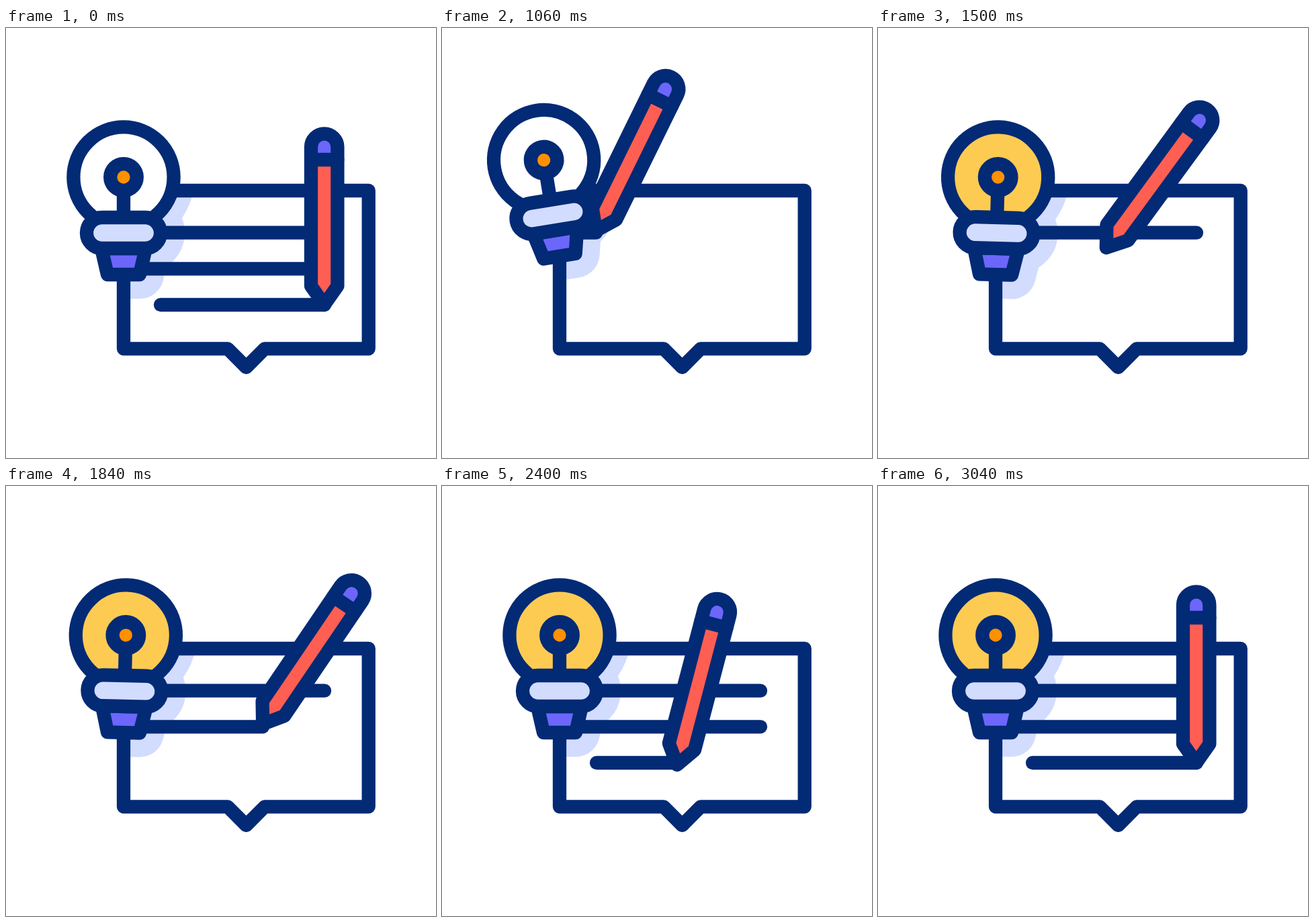
Recreate the animation shown at these times as an HTML page with a canvas. Size 640 px wide and 640 px high, loop 3.6 s.

```html
<!DOCTYPE html>
<html lang="en">
<head>
<meta charset="utf-8">
<title>Idea note</title>
<style>
html, body { margin: 0; width: 100%; height: 100%; overflow: hidden; background: #fff; }
canvas { display: block; width: 640px; height: 640px; }
</style>
</head>
<body>
<canvas id="stage" width="640" height="640"></canvas>
<script>
const ctx = document.getElementById('stage').getContext('2d');
const LOOP = 3600;
const W = 20.3;
const NAVY = '#032a75', PALE = '#d2dcff', VIOLET = '#6c66fa';
const RED = '#ff5f52', ORANGE = '#ff9000', YELLOW = '#fecb52';

const clamp = v => Math.max(0, Math.min(1, v));
const ease = u => u * u * (3 - 2 * u);
const span = (t, a, b) => ease(clamp((t - a) / (b - a)));
const mix = (a, b, s) => a + (b - a) * s;
const rad = deg => deg * Math.PI / 180;

// Each line is written from x to END while the pencil leans from tilt[0] to tilt[1].
const END = 474;
const LINES = [
  { x: 195, y: 304.7, dip: -3, write: [965, 1405], tilt: [25, 34.5] },
  { x: 195, y: 358.3, dip: -4, write: [1602, 1990], tilt: [38, 32.3] },
  { x: 230, y: 412, dip: 3, write: [2195, 2612], tilt: [21.3, 7.8] }
];
const WIPE = 512, WIPE_GAP = 150;

const rest = time => ({ time, x: 473.7, y: 412, tilt: 0 });
const stops = [rest(620)];
for (const { x, y, dip, write, tilt } of LINES) {
  [x, END].forEach((px, i) =>
    stops.push({ time: write[i], x: px, y: y + dip, tilt: tilt[i] }));
}
stops.push(rest(3040));

function pencilAt(t) {
  const i = Math.max(1, stops.findIndex(p => t < p.time));
  if (t >= stops.at(-1).time) return stops.at(-1);
  const a = stops[i - 1], b = stops[i], s = span(t, a.time, b.time);
  return { x: mix(a.x, b.x, s), y: mix(a.y, b.y, s), tilt: mix(a.tilt, b.tilt, s) };
}

// The bulb is knocked aside, then swings back with shrinking peaks.
const HIT = 905, PEAK = 1155, SWING = 228;
function swingAt(t) {
  const peak = n => n < 4 ? -13.6 * (-0.46) ** n : 0;
  if (t < PEAK) return peak(0) * span(t, HIT, PEAK);
  const n = (t - PEAK) / SWING, k = Math.floor(n);
  return mix(peak(k), peak(k + 1), ease(n - k));
}
const hopAt = t => -40 * (span(t, HIT, PEAK) - span(t, PEAK, PEAK + SWING));

function poly(points) {
  const p = new Path2D();
  points.forEach(([x, y]) => p.lineTo(x, y));
  p.closePath();
  return p;
}
function circle(x, y, r) {
  const p = new Path2D();
  p.arc(x, y, r, 0, Math.PI * 2);
  return p;
}
function pill(x, y, w, h) {
  const p = new Path2D();
  p.roundRect(x, y, w, h, h / 2);
  return p;
}

const bubble = poly([[175, 242], [539.7, 242], [539.7, 477.3], [385, 477.3],
  [357.5, 505], [330, 477.3], [175, 477.3]]);
const glass = circle(175, 222, 74.6);
const collar = pill(120, 282, 110, 46);
const socket = poly([[142, 328], [208, 328], [199, 367], [151, 367]]);

// pencil with its tip at the origin
const body = new Path2D();
body.arc(0, -235, 19.7, Math.PI, 0);
body.lineTo(19.7, -28);
body.lineTo(0, 0);
body.lineTo(-19.7, -28);
body.closePath();

function stroke(path, color = NAVY, width = W) {
  ctx.strokeStyle = color;
  ctx.lineWidth = width;
  ctx.stroke(path);
}
function fill(path, color) {
  ctx.fillStyle = color;
  ctx.fill(path);
}
function shape(path, color) {
  fill(path, color);
  stroke(path);
}
function segment(x1, y1, x2, y2) {
  const p = new Path2D();
  p.moveTo(x1, y1);
  p.lineTo(x2, y2);
  stroke(p);
}

function placeBulb(t) {
  ctx.translate(175, 367 + hopAt(t));
  ctx.rotate(rad(swingAt(t)));
  ctx.translate(-175, -367);
}

function drawShadow(t) {
  ctx.save();
  ctx.clip(bubble);
  placeBulb(t);
  fill(circle(175, 222, 106), PALE);
  for (const part of [collar, socket]) {
    fill(part, PALE);
    stroke(part, PALE, 72);
  }
  ctx.restore();
}

function drawLines(t) {
  LINES.forEach(({ x, y, write }, i) => {
    const wipeStart = i * WIPE_GAP, wipeEnd = wipeStart + WIPE;
    const wiping = t < wipeEnd;
    const from = wiping ? mix(x, END, span(t, wipeStart, wipeEnd)) : x;
    const to = wiping ? END : mix(x, END, span(t, ...write));
    if (to - from > 0.01) segment(from, y, to, y);
  });
}

function drawBulb(t) {
  ctx.save();
  placeBulb(t);
  fill(glass, '#fff');
  ctx.globalAlpha = span(t, 1130, 1300);
  fill(glass, YELLOW);
  ctx.globalAlpha = 1;
  stroke(glass);
  segment(175, 246, 175, 285);
  shape(circle(175, 222, 19.8), ORANGE);
  shape(socket, VIOLET);
  shape(collar, PALE);
  ctx.restore();
}

function drawPencil(t) {
  const { x, y, tilt } = pencilAt(t);
  ctx.save();
  ctx.translate(x, y);
  ctx.rotate(rad(tilt));
  fill(body, RED);
  ctx.save();
  ctx.clip(body);
  ctx.fillStyle = VIOLET;
  ctx.fillRect(-30, -270, 60, 54);
  ctx.restore();
  segment(-19.7, -216, 19.7, -216);
  stroke(body);
  ctx.restore();
}

function draw(t) {
  ctx.fillStyle = '#fff';
  ctx.fillRect(0, 0, 640, 640);
  ctx.lineJoin = ctx.lineCap = 'round';
  drawShadow(t);
  stroke(bubble);
  drawLines(t);
  drawBulb(t);
  drawPencil(t);
}

const start = performance.now();
function tick() {
  draw((performance.now() - start) % LOOP);
  requestAnimationFrame(tick);
}
tick();
</script>
</body>
</html>
```
